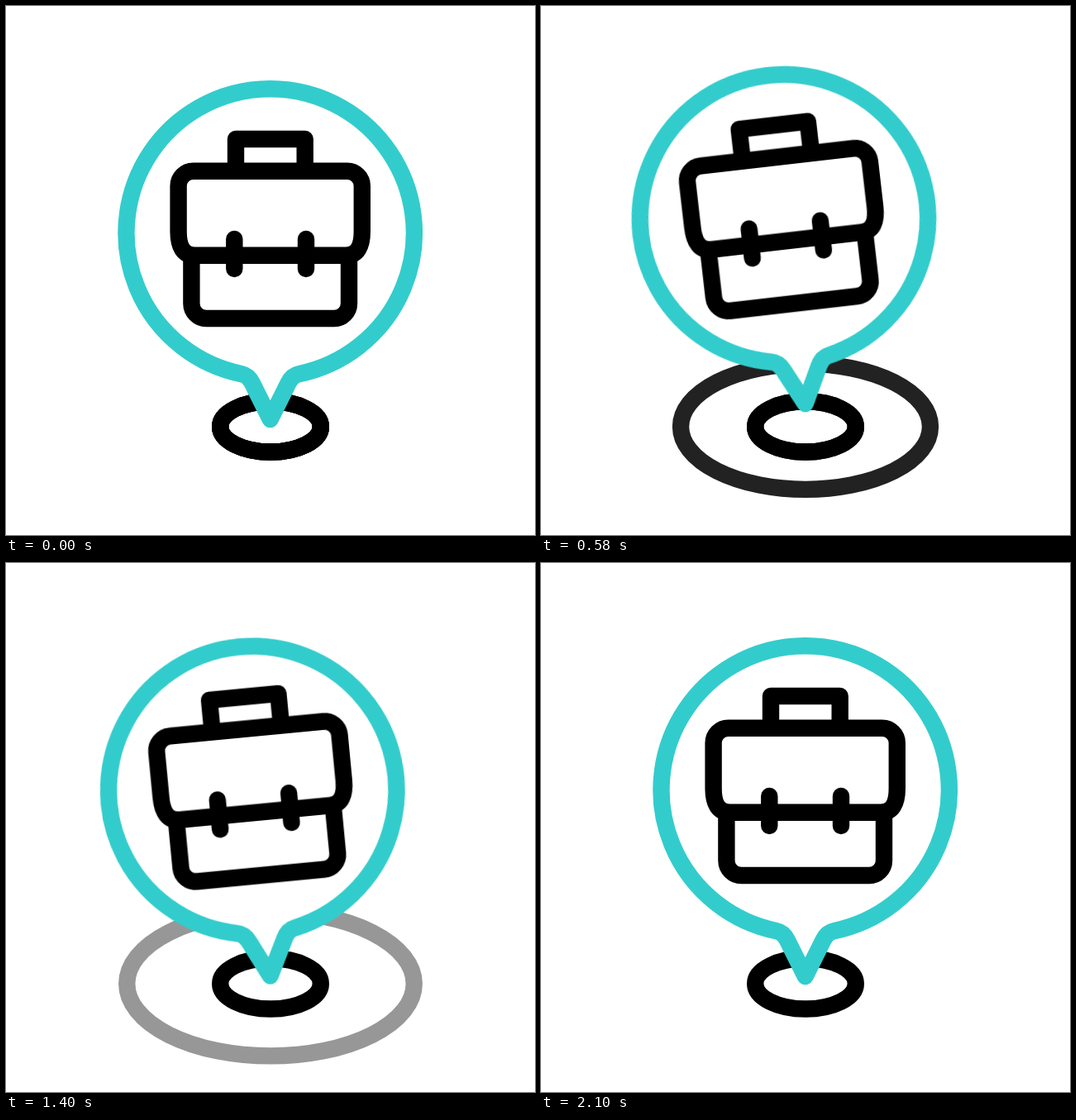
Write an HTML page that moves like this. It is 640 px wide and 640 px high and loops after 2.4 s.

```html
<!DOCTYPE html>
<html lang="en">
<head>
<meta charset="utf-8">
<title>Job location pin</title>
<style>
  html, body { margin: 0; width: 100%; height: 100%; overflow: hidden; background: #fff; }
  svg { display: block; width: 100%; height: 100%; }

  svg * { stroke-linecap: round; stroke-linejoin: round; }
  .ring, .case { fill: none; stroke: #000; stroke-width: 20.4px; }
  .pin { fill: #fff; stroke: #3cc; stroke-width: 20.4px; }

  .hop, .swing {
    animation: hop 2400ms cubic-bezier(.333, 0, .667, 1) infinite;
  }
  .swing {
    animation-name: swing;
    transform-origin: 319.7px 500px;
  }
  .ripple {
    animation:
      grow 2400ms cubic-bezier(.333, 0, .667, 1) infinite,
      fade 2400ms linear infinite;
  }
  .late { animation-delay: 672ms; }

  /* Three hops, each lower than the last */
  @keyframes hop {
    0%, 29.58%, 59.38%, 87.5%, 100% { transform: translateY(0); }
    15.29% { transform: translateY(-59.3px); }
    44.42% { transform: translateY(-45.2px); }
    74.58% { transform: translateY(-35px); }
  }
  /* Damped swing around the tip */
  @keyframes swing {
    0%, 87.5%, 100% { transform: rotate(0deg); }
    16.62% { transform: rotate(-18deg); }
    36.12% { transform: rotate(16deg); }
    54.17% { transform: rotate(-8deg); }
    68.33% { transform: rotate(4deg); }
  }
  @keyframes grow {
    0% { rx: 60.8px; ry: 30.6px; }
    36.25%, 100% { rx: 182.3px; ry: 91.8px; }
  }
  @keyframes fade {
    0%, 22.38% { opacity: 1; }
    35.83%, 100% { opacity: 0; }
  }
</style>
</head>
<body>
<svg viewBox="0 0 640 640">
  <ellipse class="ring ripple" cx="320" cy="508.9" rx="60.8" ry="30.6"/>
  <ellipse class="ring ripple late" cx="320" cy="508.9" rx="60.8" ry="30.6"/>
  <ellipse class="ring" cx="320" cy="508.9" rx="60.8" ry="30.6"/>
  <g class="hop">
    <g class="swing">
      <path class="pin" d="M319.7 500 L297.9 456.3 C295 450.5 291 446.4 285 445.2
        A174.2 174.2 0 1 1 354.4 445.2 C348.4 446.4 344.4 450.5 341.5 456.3 Z"/>
      <g class="case">
        <path d="M278 199.8 V161 H361.7 V199.8"/>
        <path d="M226.6 199.8 H412.8 A18 18 0 0 1 430.8 217.8 V273
          C430.8 291 425 301.8 411 301.8 H228.4 C214.4 301.8 208.6 291 208.6 273
          V217.8 A18 18 0 0 1 226.6 199.8 Z"/>
        <path d="M224.4 301.8 V360 A18 18 0 0 0 242.4 378 H397 A18 18 0 0 0 415 360 V301.8"/>
        <path d="M276.3 282 V318 M363 282 V318"/>
      </g>
    </g>
  </g>
</svg>
</body>
</html>
```
